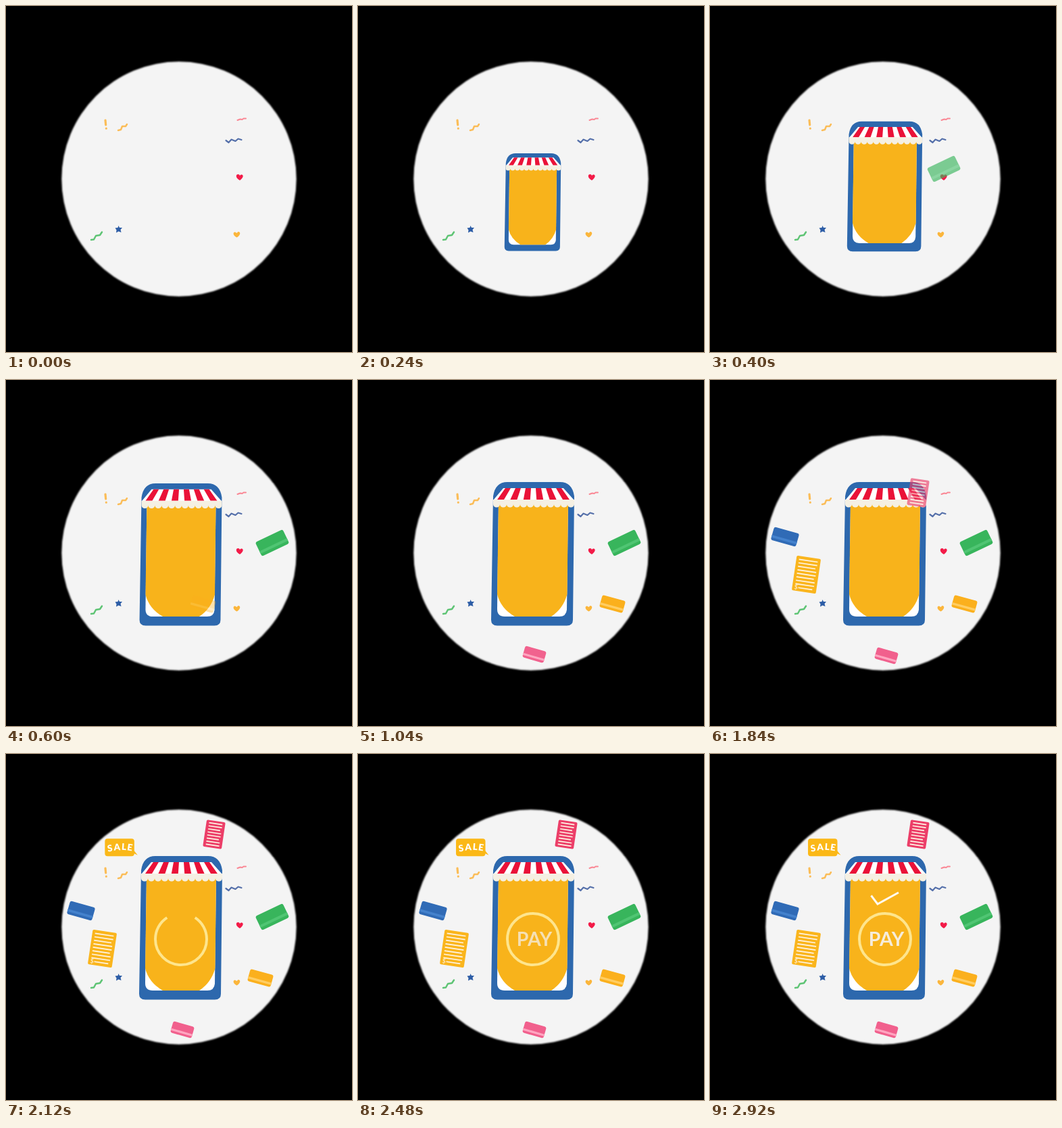
These frames come from a looping animation (512 px wide and 512 px high, 3000 ms). An HTML page:

```html
<!DOCTYPE html>
<html lang="en">
<head>
<meta charset="utf-8">
<title>Mobile shop payment</title>
<style>
  html, body { margin: 0; width: 100%; height: 100%; overflow: hidden; background: #000; }
  svg { display: block; width: 100vw; height: 100vh; }
  text { font-family: Lato, "Open Sans", sans-serif; }
</style>
</head>
<body>
<svg viewBox="0 0 512 512">
  <defs>
    <filter id="soft"><feGaussianBlur stdDeviation="0.9"/></filter>
    <filter id="faint" x="-20%" y="-20%" width="140%" height="140%"><feGaussianBlur stdDeviation="0.55"/></filter>
  </defs>
  <circle cx="256" cy="256" r="173.7" fill="#f4f4f4" filter="url(#soft)"/>

  <g fill="none" stroke-width="2.5" stroke-linecap="round" stroke-linejoin="round" filter="url(#faint)">
    <path d="M147 169l.7 7m.6 5v.2" stroke="#fbbd58" stroke-width="3.2"/>
    <path d="M166 184l4-1 2-5 5 0 2-3" stroke="#fbbd58"/>
    <path d="M342.500 169l4-1.500 3 .5 2-1.500 3.500 0" stroke="#fa8794" stroke-width="2"/>
    <path d="M325.500 199l4 3 4-4.500 6 2.500 4-3.500 5 1.500" stroke="#5570aa" stroke-width="2.200"/>
    <path d="M126 346l4-.5 3-5.500 6-1 3-4.500" stroke="#5ec474"/>
    <path d="M346 258c-7-4-6-9-2.500-9q2 0 2.500 2 1-2 3-1.500c3 1 2 5-3 8.500z" fill="#f31b48"/>
    <path d="M166.500 325l1.500 3 4 0-2.500 3 1 4-4-1.500-3.500 2 .5-4-2-3 4-.5z" fill="#2d5da6"/>
    <path d="M341.500 342.500c-6-3-6-8-2.500-8l2.500 1.500 2-2c4 0 4 5-2 8.500z" fill="#fbb63c"/>
  </g>

  <g id="phone">
    <path d="M200 172Q203 151 221 151H299Q317 151 320 172L318 355Q318 363.500 309 363.500H206Q197 363.500 197 355Z" fill="#2d68ad"/>
    <path d="M208 180H311L309 340Q308 350 298 350H217Q206 350 206 339Z" fill="#fff"/>
    <path d="M208 180H311L309.500 317Q304 338 286 350H232Q211 338 206 317Z" fill="#f8b31b"/>
    <path d="M215 160H304L320 178H200Z" fill="#fff"/>
    <path id="stripes" fill="#ea1238"/>
    <path id="valance" fill="#f5f0e3"/>
  </g>
  <g id="items"></g>

  <g fill="none">
    <path id="left" d="M259 312A38 38 0 0 1 259 236" pathLength="1"/>
    <path id="right" d="M259 312A38 38 0 0 0 259 236" pathLength="1"/>
    <path id="check" d="M238.500 209.500L248 222 279 205" pathLength="1"/>
  </g>
  <text id="pay" x="261" y="283.500" font-size="28.500" font-weight="700" text-anchor="middle" fill="#f5ecdc">PAY</text>
</svg>
<script>
const $ = id => document.getElementById(id);
const clamp = v => Math.max(0, Math.min(1, v));
const easeOut = (t, start, length, power = 2) => 1 - (1 - clamp((t - start) / length)) ** power;

// Awning
let stripes = "", valance = "M200 177H320V184";
for (let i = 0; i < 6; i++) {
  const top = 259.5 + (i - 2.5) * 15, low = 259.5 + (i - 2.5) * 19.4;
  stripes += `M${top - 4} 160h8L${low + 5} 177h-10Z`;
}
for (let i = 0; i < 12; i++) valance += "a5 4.500 0 0 1-10 0";
$("stripes").setAttribute("d", stripes);
$("valance").setAttribute("d", valance + "Z");

const card = (w, h, color, band) =>
  `<rect x="${-w / 2}" y="${-h / 2}" width="${w}" height="${h}" rx="3" fill="${color}"/>
   <rect x="${-w / 2}" y="${h * 0.13}" width="${w}" height="${h * 0.18}" fill="${band}"/>`;

function receipt(w, h, color, lines, price) {
  const gap = h * 0.8 / (lines - 1);
  let d = "";
  for (let i = 0; i < lines; i++) {
    const inset = price && i === lines - 1 ? 9 : 4;
    d += `M${inset - w / 2} ${i * gap - h * 0.4}H${w / 2 - (i % 3 === 2 ? 6 : 4)}`;
  }
  return `<rect x="${-w / 2}" y="${-h / 2}" width="${w}" height="${h}" rx="2" fill="${color}"/>
    <path d="${d}" stroke="#fff4e4" stroke-width="1.700"/>` +
    (price ? `<text x="${3 - w / 2}" y="${h * 0.45}" font-size="9" fill="#fff4e4">$</text>` : "");
}

const sale = `<rect x="-22" y="-13" width="43.500" height="26" rx="4" fill="#fbb817"/>
  <path d="M19 2L26.500 11.500 17 7Z" fill="#fbb817"/>
  <text x="-17.500 -8.500 2.500 10.500" y="6.500 4.500 3.500 4" rotate="-9 -3 4 9"
    font-size="13.500" font-weight="900" fill="#fff">SALE</text>`;

// Each item slides in from (dx, dy) while it fades in.
const items = [
  { x: 394, y: 241, turn: -25.5, dx: -133, dy: 0, start: 280, art: card(45, 23, "#38b55c", "#50c573") },
  { x: 376.5, y: 331.5, turn: 15.5, dx: -133, dy: 0, start: 540, art: card(35.5, 18.5, "#fbb01d", "#ffcd62") },
  { x: 261, y: 408, turn: 16, dx: 0, dy: -133, start: 776, art: card(32.5, 17.5, "#f1608d", "#ffa5c0") },
  { x: 111, y: 232, turn: 16, dx: 133, dy: 0, start: 1120, art: card(38.5, 20, "#306bb6", "#4482cd") },
  { x: 142.5, y: 288, turn: 8.5, dx: 133, dy: 0, start: 1480, art: receipt(36, 52, "#fab51d", 9, true) },
  { x: 308, y: 119, turn: 8.5, dx: 0, dy: 133, start: 1720, art: receipt(28, 40, "#ec3e68", 8) },
  { x: 167, y: 138.3, turn: 0, dx: 133, dy: 0, start: 1850, art: sale }
];
$("items").innerHTML = items.map(o => `<g>${o.art}</g>`).join("");
items.forEach((o, i) => o.node = $("items").children[i]);

function line(id, part, color, width) {
  const s = $(id).style;
  s.stroke = color;
  s.strokeWidth = width;
  s.strokeDasharray = `${part} 2`;
  s.visibility = part > 0 ? "visible" : "hidden";
}

function draw(t) {
  const size = easeOut(t, 40, 809, 4);
  $("phone").setAttribute("transform", `translate(258.500 360) scale(${size}) translate(-258.500 -360)`);
  for (const o of items) {
    const k = easeOut(t, o.start, 300), away = 1 - k;
    o.node.setAttribute("transform", `translate(${o.x + o.dx * away} ${o.y + o.dy * away}) rotate(${o.turn})`);
    o.node.setAttribute("opacity", k);
  }
  const ring = easeOut(t, 1840, 490);
  line("left", ring, "#fee58d", 4);
  line("right", ring, "#fee58d", 4);
  line("check", easeOut(t, 2560, 350), "#fffaf0", 3);
  $("pay").setAttribute("opacity", easeOut(t, 2260, 400));
}

const begin = performance.now();
function tick() {
  const t = (performance.now() - begin) % 3000;
  draw(Math.min(2920, Math.floor(t / 40) * 40));
  requestAnimationFrame(tick);
}
tick();
</script>
</body>
</html>
```
